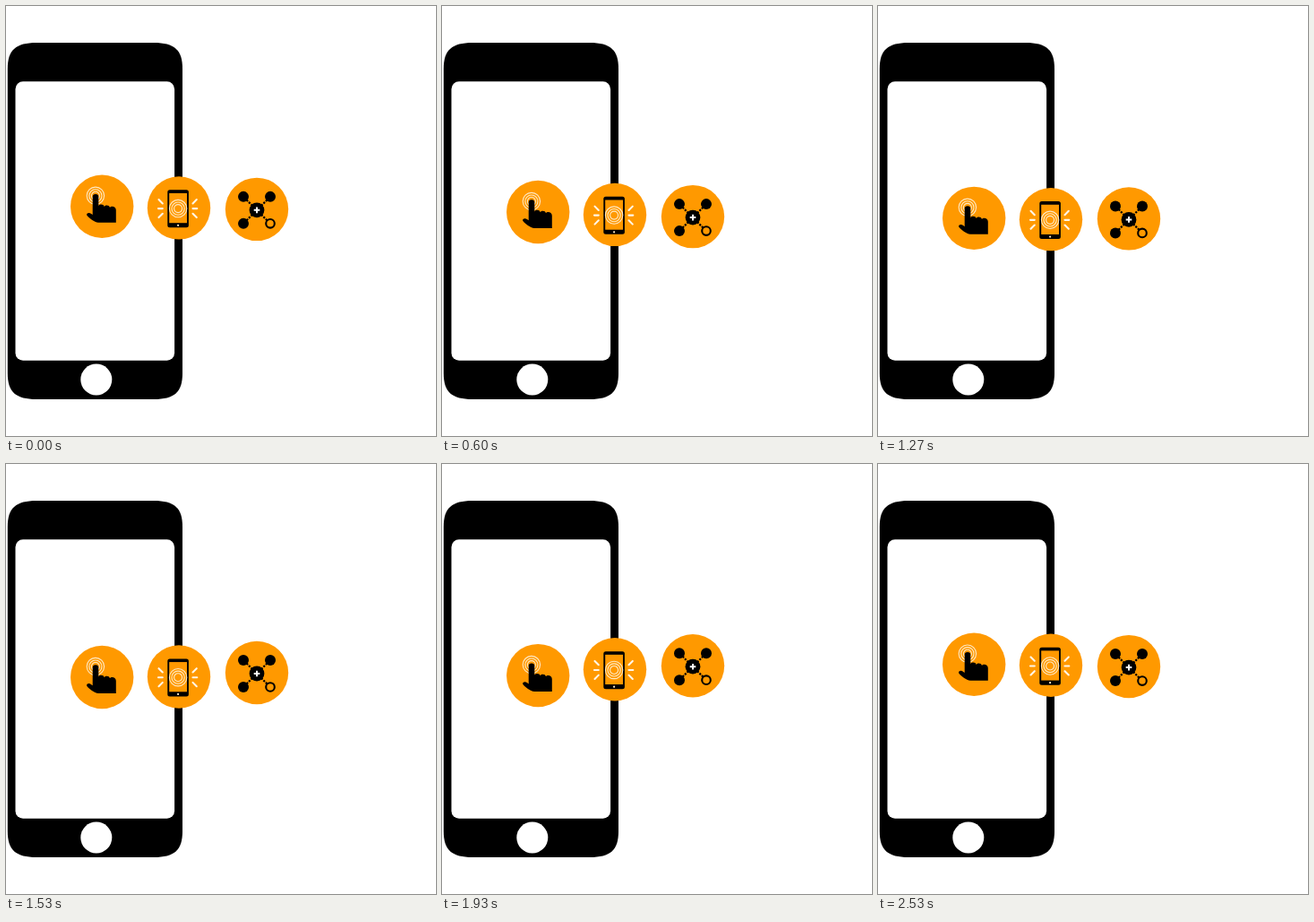
These frames come from a looping animation (480 by 480 pixels, 2.59 s). An HTML page:

```html
<!DOCTYPE html>
<html lang="en">
<head>
<meta charset="utf-8">
<title>Floating badges</title>
<style>
  html, body { margin: 0; width: 100%; height: 100%; overflow: hidden; background: #fff; }
  svg { display: block; width: 100%; height: 100%; }
  .badge { fill: #ff9900; }
  .ripple { fill: none; stroke: #ffe9c4; stroke-width: 1.1; }
  .rays { fill: none; stroke: #fff6e6; stroke-width: 2.1; stroke-linecap: round; }
  .links { fill: none; stroke: #000; stroke-width: 2.2; stroke-dasharray: 2.2 1.3; }
</style>
</head>
<body>
<svg viewBox="0 0 480 480">
  <defs>
    <circle id="disc" class="badge" r="35.2"/>
    <g id="ripple" class="ripple"><circle r="4.5"/><circle r="7.1"/><circle r="9.7"/></g>
  </defs>

  <path d="M1.8 70C1.8 49 11 41 34 41H165C188 41 197 49 197 70V410C197 431 188 439 165 439H34C11 439 1.8 431 1.8 410Z"/>
  <rect x="10.5" y="84.2" width="177.6" height="311.5" rx="8.5" fill="#fff"/>
  <circle cx="100.8" cy="417" r="17.5" fill="#fff"/>

  <g id="tap">
    <use href="#disc"/>
    <use href="#ripple" x="-7.3" y="-12"/>
    <path d="M-10.5 -10.4a3.3 3.3 0 0 1 6.6 0V-.3C-3.5 -2.9 2 -2.9 2.4 .2C3.2 -2 8.2 -2 8.8 1.2C9.8 -.9 15.6 -.6 15.6 4V18H-4C-9 17.3 -14 13.5 -17 9.7C-17.8 6.8 -14 6.3 -12 8.2L-10.5 9.3Z"/>
  </g>

  <g id="ring">
    <use href="#disc"/>
    <rect x="-12.7" y="-20.1" width="23.6" height="42" rx="2.5"/>
    <rect class="badge" x="-10.8" y="-16.4" width="19.8" height="33.2"/>
    <circle cx="-.9" cy="19.4" r="1.1" fill="#ffe9c4"/>
    <use href="#ripple" x="-.9" y=".7"/>
    <path class="rays" d="M-22.5 -9.3l4.3 4.3M-23 .7h4.8M-22.5 10.7l4.3 -4.3M15.5 -5l4.3 -4.3M15.5 .7h4.8M15.5 6.4l4.3 4.3"/>
  </g>

  <g id="net">
    <use href="#disc"/>
    <path class="links" d="M0 1L-15 -14M0 1L15 -14M0 1L-15 16M0 1L11.5 12.5"/>
    <circle cx="-15" cy="-14" r="6"/>
    <circle cx="15" cy="-14" r="6"/>
    <circle cx="-15" cy="16" r="6"/>
    <circle cx="15" cy="16" r="4.8" fill="#ff9900" stroke="#000" stroke-width="2.1"/>
    <circle cy="1" r="8.4"/>
    <path d="M-3.3 1H3.3M0 -2.3V4.3" stroke="#fff" stroke-width="2"/>
  </g>
</svg>
<script>
  const LOOP = 2590, PERIOD = 2600, STEP = 1000 / 15;
  const LOWEST = 238.3, HIGHEST = 223.7;

  // Each badge sinks slowly from `top` to `bottom` (ms), then floats back up.
  const badges = [
    { id: 'tap', x: 107.2, top: 2560, bottom: 1720, skew: 0.77 },
    { id: 'ring', x: 193, top: 2330, bottom: 1390, skew: 0.83 },
    { id: 'net', x: 280, top: 2150, bottom: 1100, skew: 0.95 }
  ];
  for (const b of badges) b.el = document.getElementById(b.id);

  const ease = u => (1 - Math.cos(Math.PI * u)) / 2;

  function heightAt({ top, bottom, skew }, t) {
    const rise = top - bottom, sink = PERIOD - rise;
    const since = (t - top + PERIOD) % PERIOD;
    const depth = since < sink
      ? ease((since / sink) ** skew)
      : 1 - ease((since - sink) / rise);
    return HIGHEST + (LOWEST - HIGHEST) * depth;
  }

  const start = performance.now();
  function draw(now) {
    const t = Math.max(0, now - start) % LOOP;
    const held = Math.floor((t + 3.4) / STEP) * STEP;
    for (const b of badges) {
      b.el.setAttribute('transform', `translate(${b.x} ${heightAt(b, held).toFixed(2)})`);
    }
    requestAnimationFrame(draw);
  }
  draw(start);
</script>
</body>
</html>
```
